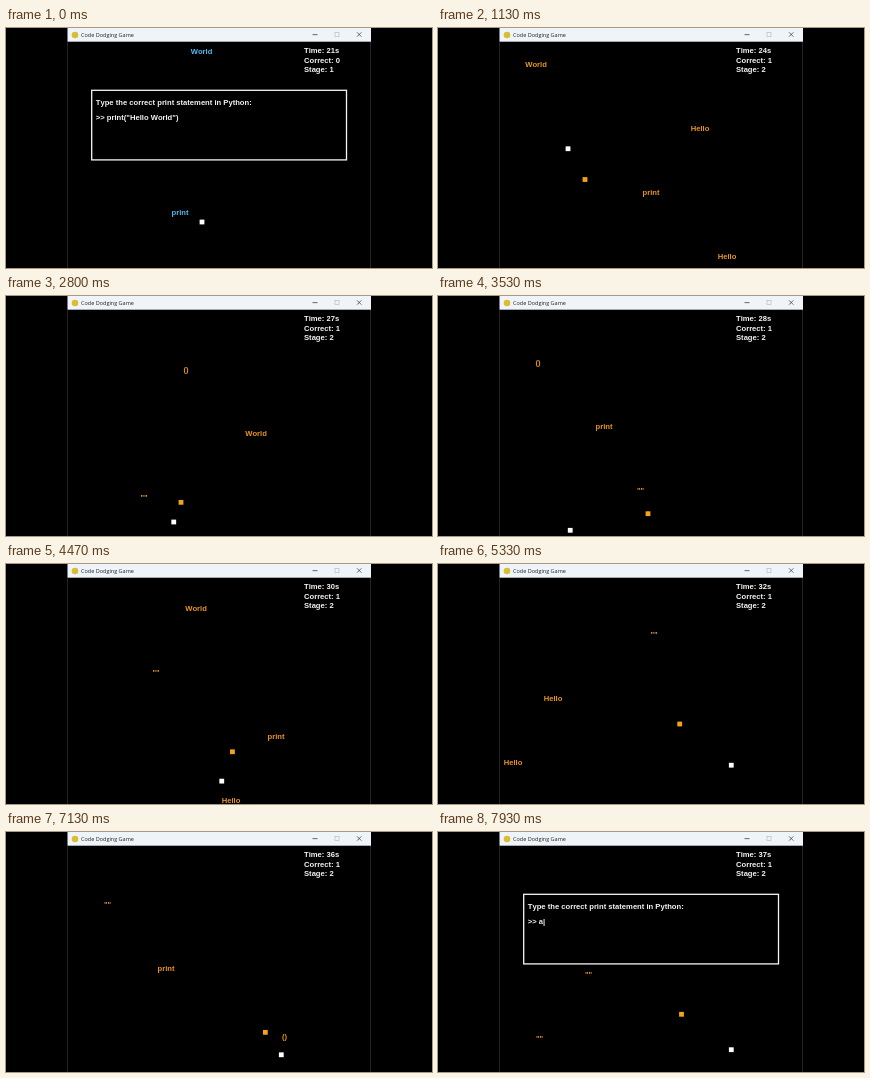
Animation, 426 px wide and 240 px high, one loop 8 s. Source, as an HTML page with a canvas:

```html
<!DOCTYPE html>
<html lang="en">
<head>
<meta charset="utf-8">
<title>Code Dodging Game</title>
<style>
  html, body { margin: 0; width: 100%; height: 100%; overflow: hidden; background: #000; }
  canvas { display: block; width: 100vw; height: 100vh; }
</style>
</head>
<body>
<canvas id="stage" width="426" height="240"></canvas>
<script>
const ctx = document.getElementById('stage').getContext('2d');
const LOOP = 8000, FPS = 15;
const STAGE_TWO = 0.2, PROMPT = 7.67, KEY_PRESS = 7.73;   // seconds
const ORANGE = '#e8951f', BLUE = '#55b9f2', WHITE = '#f4f4f4';
const GAME_FONT = 'bold 7.63px "Liberation Sans", Arial, sans-serif';
const SPACING = 64;

// Falling words in spawn order: text, centre x, optional height offset
const words = [
  ['Hello', 289], ['print', 213], ['Hello', 262], ['World', 98],
  ['Hello', 310], ['()', 121], ['""', 310], ['""', 138],
  ['World', 250], ['()', 180], ['""', 202.5], ['print', 166],
  ['()', 100], ['Hello', 225], ['print', 270], ['""', 150],
  ['World', 190], ['Hello', 75], ['Hello', 115], ['""', 216],
  ['print', 240], ['World', 345], ['World', 282.5], ['""', 88.5, 6],
  ['()', 278.5, 4], ['print', 160], ['""', 101.5], ['""', 150.5]
];
const openingWords = [['World', 195.5, 23], ['print', 174, 184]];

// Keys: time, then values
const fall = [[STAGE_TWO, -5], [1.133, 228], [2.067, 465], [3.533, 834],
  [5.333, 1286], [6.4, 1553], [PROMPT, 1870]];
const player = [[STAGE_TWO, 196, 194], [1.133, 130, 120.7], [2.067, 203.3, 217.7],
  [3.533, 132.2, 234.3], [5.333, 293.3, 201.2], [6.4, 250.7, 229.7], [PROMPT, 293.3, 217.7]];
const chaser = [[STAGE_TWO, 190, 110], [1.133, 147, 151.5], [2.067, 140, 195],
  [3.533, 210, 217.7], [5.333, 241.7, 160], [6.4, 281, 225], [PROMPT, 243.5, 182.3]];

function track(keys, t) {
  if (t <= keys[0][0]) return keys[0].slice(1);
  const i = keys.findIndex(key => key[0] > t);
  if (i < 0) return keys[keys.length - 1].slice(1);
  const [a, b] = [keys[i - 1], keys[i]];
  const k = (t - a[0]) / (b[0] - a[0]);
  return a.slice(1).map((v, n) => v + (b[n + 1] - v) * k);
}

function text(string, x, y, color = WHITE, align = 'left') {
  ctx.font = GAME_FONT;
  ctx.fillStyle = color;
  ctx.textAlign = align;
  ctx.fillText(string, x, y);
}

function rect(x, y, w, h, color) {
  ctx.fillStyle = color;
  ctx.fillRect(x, y, w, h);
}

function square([x, y], color) {
  rect(x - 2.4, y - 2.4, 4.8, 4.8, color);
}

function word(string, x, y, color) {
  if (y > -10 && y < 250) text(string, x, y + 2.7, color, 'center');
}

function drawPrompt(answer) {
  rect(85, 62, 256, 70, '#000');
  ctx.strokeStyle = WHITE;
  ctx.lineWidth = 1.3;
  ctx.strokeRect(85.7, 62.3, 254.8, 69.6);
  text('Type the correct print statement in Python:', 89.8, 77.2);
  text('>> ' + answer, 89.8, 91.5);
}

function drawWindow() {
  rect(61, 14, 1, 226, '#242424');
  rect(364, 14, 1, 226, '#242424');
  rect(61.5, 0, 303.5, 13.7, '#eff4f9');
  ctx.fillStyle = '#d9bd35';
  ctx.beginPath();
  ctx.arc(69, 7, 3.3, 0, 7);
  ctx.fill();
  ctx.font = '5.5px "Open Sans", sans-serif';
  ctx.fillStyle = '#222';
  ctx.textAlign = 'left';
  ctx.fillText('Code Dodging Game', 75, 9);
  rect(306.5, 6.3, 5, 0.8, '#444');
  ctx.lineWidth = 0.7;
  ctx.strokeStyle = '#b9bdc1';
  ctx.strokeRect(329, 4.5, 4, 4);
  ctx.strokeStyle = '#333';
  ctx.beginPath();
  ctx.moveTo(351, 4.3); ctx.lineTo(355.4, 8.7);
  ctx.moveTo(355.4, 4.3); ctx.lineTo(351, 8.7);
  ctx.stroke();
}

function draw(t) {
  const second = t >= STAGE_TWO;
  const [distance] = track(fall, t);
  rect(0, 0, 426, 240, '#000');
  ctx.fontKerning = 'none';

  for (const [string, x, y] of openingWords)
    word(string, x, y + distance - fall[0][1], second ? ORANGE : BLUE);
  if (second) {
    words.forEach(([string, x, dy = 0], i) => word(string, x, distance - SPACING * i + dy, ORANGE));
    square(track(chaser, t), '#f5a21b');
  }
  square(track(player, t), '#fff');

  text(`Time: ${Math.floor(21.8 + 2 * t)}s`, 298, 25);
  text(`Correct: ${second ? 1 : 0}`, 298, 34.5);
  text(`Stage: ${second ? 2 : 1}`, 298, 44);

  if (!second) drawPrompt('print("Hello World")');
  else if (t >= PROMPT - 0.01) drawPrompt(t >= KEY_PRESS ? 'a|' : '|');
  drawWindow();
}

const start = performance.now();
function tick() {
  const ms = (performance.now() - start) % LOOP;
  draw(Math.floor((ms + 4) * FPS / 1000) / FPS);
  requestAnimationFrame(tick);
}
tick();
</script>
</body>
</html>
```
